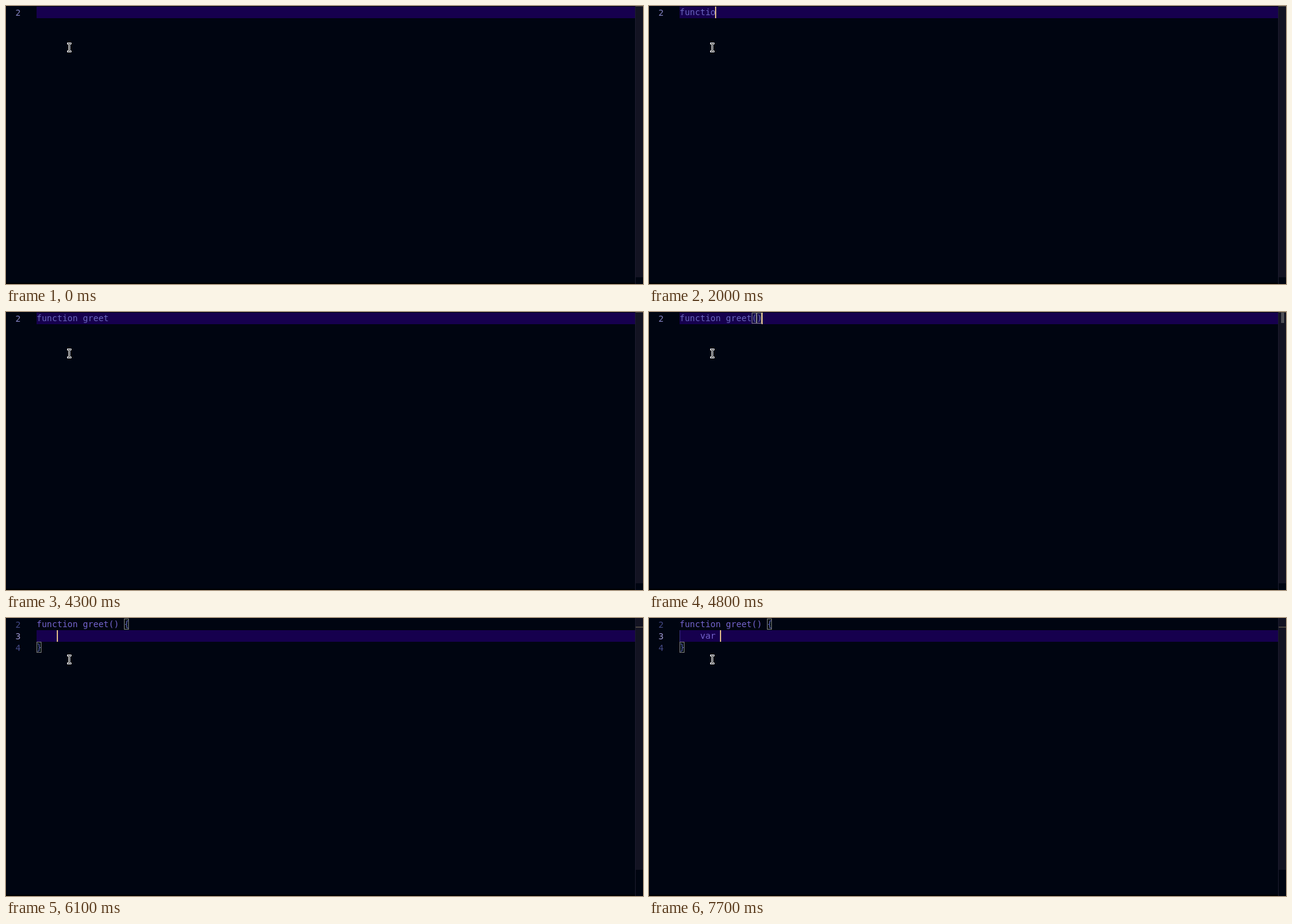
Animation of 1042x456 px, one loop 8000 ms. Source, as an HTML page with a canvas:

```html
<!DOCTYPE html>
<html lang="en">
<head>
<meta charset="utf-8">
<title>Typing a function</title>
<style>
html, body { margin: 0; width: 100%; height: 100%; overflow: hidden; background: #000511; }
canvas { display: block; }
</style>
</head>
<body>
<canvas id="stage" width="1042" height="456"></canvas>
<script>
const ctx = document.getElementById('stage').getContext('2d');
const LOOP = 8000, LEFT = 50, CHAR = 8.428, LINE = 19;
const HEAD = 'function greet()';
const ENTER = 6100;

// [time, text of the edited line, caret column (-1 hides it), brackets matched from column]
const steps = [
  [0, '', -1],
  [100, '', 0],
  [600, '', -1],
  [1000, 'f', 1],
  [1100, 'fu', 2],
  [1400, 'fun', 3],
  [1800, 'func', 4],
  [1900, 'functi', 6],
  [2000, 'functio', 7],
  [2200, 'function', 8],
  [2500, 'function ', 9],
  [2900, 'function g', 10],
  [3100, 'function gr', 11],
  [3500, 'function gre', 12],
  [3700, 'function greet', 14],
  [4300, 'function greet', -1],
  [4700, HEAD, 15],
  [4800, HEAD, 16, 14],
  [5400, HEAD + ' ', 17],
  [5600, HEAD + ' {}', 18],
  [5800, HEAD + ' {}', 18, 17],
  [ENTER, '', 4],
  [6500, '', -1],
  [7200, '    v', 5],
  [7300, '    va', 6],
  [7700, '    var ', 8]
];

function rect(color, x, y, w, h) {
  ctx.fillStyle = color;
  ctx.fillRect(x, y, w, h);
}

const lineTop = row => 1 + row * LINE;

function write(str, col, row, color) {
  ctx.fillStyle = color;
  ctx.fillText(str, LEFT + col * CHAR, lineTop(row) + 14);
}

function lineNumber(row, color) {
  ctx.fillStyle = color;
  ctx.fillText(row + 2, 15.5, lineTop(row) + 15);
}

function bracketBox(col, row) {
  const x = Math.round(LEFT + col * CHAR), y = lineTop(row);
  rect('rgba(0,100,0,0.1)', x, y, 8, 18);
  ctx.strokeStyle = '#808080';
  ctx.lineWidth = 1;
  ctx.strokeRect(x + 0.5, y + 0.5, 7, 17);
}

function caret(col, row) {
  if (col < 0) return;
  const x = Math.max(LEFT, Math.floor(LEFT - 0.5 + col * CHAR));
  rect('#ddbb88', x, lineTop(row), 2, LINE);
}

function scrollbar(split, matched) {
  rect('#1c1c2e', 1029, 0, 1, 456);
  rect('#131322', 1030, 0, 12, split ? 413 : 445);
  if (matched && !split) rect('#505058', 1034, 0, 5, 18);
  rect('#49443f', 1030, split ? 14 : 0, 12, split ? 2 : 1);
}

function pointer() {
  rect('#fff', 100, 60, 7, 3);
  rect('#fff', 102, 60, 3, 16);
  rect('#fff', 100, 73, 7, 3);
  for (const y of [61, 74]) {
    rect('#000', 101, y, 2, 1);
    rect('#000', 104, y, 2, 1);
  }
  rect('#000', 103, 62, 1, 12);
}

function draw(t) {
  const [, text, col, match] = steps.filter(s => s[0] <= t).pop();
  const split = t >= ENTER;
  const row = split ? 1 : 0;
  const color = split ? '#7464cc' : '#6a66c0';

  rect('#000511', 0, 0, 1042, 456);
  rect('#000', 0, 454, 1029, 2);
  rect('#16004e', LEFT, lineTop(row), 979, LINE);
  scrollbar(split, match !== undefined);

  ctx.font = '14px "DejaVu Sans Mono", monospace';
  ctx.textBaseline = 'alphabetic';
  if (split) {
    bracketBox(17, 0);
    bracketBox(0, 2);
    write(HEAD, 0, 0, color);
    write('{', 17, 0, '#5f60b4');
    write('}', 0, 2, '#5f60b4');
    lineNumber(0, '#444a86');
    lineNumber(2, '#444a86');
    if (text) rect('#3a3480', LEFT, lineTop(1), 1, LINE);
  } else if (match !== undefined) {
    bracketBox(match, 0);
    bracketBox(match + 1, 0);
  }
  write(text, 0, row, color);
  lineNumber(row, split ? '#a09ad4' : '#8585c5');
  caret(col, row);
  pointer();
}

const start = performance.now();
function tick() {
  draw((performance.now() - start) % LOOP);
  requestAnimationFrame(tick);
}
tick();
</script>
</body>
</html>
```
